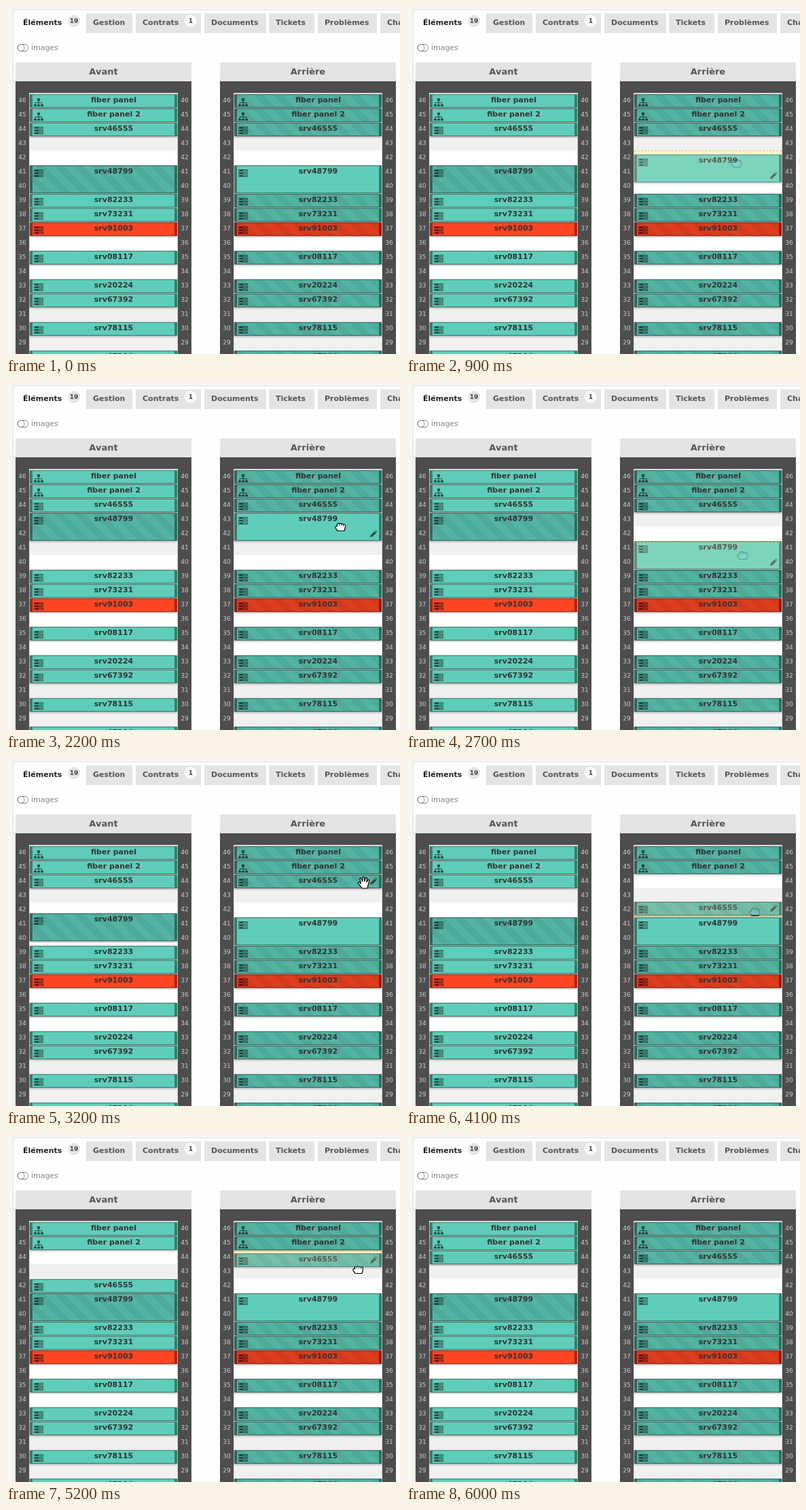
Recreate the animation shown at these times as an HTML page. Size 580 by 513 pixels, loop 7.2 s.

```html
<!DOCTYPE html>
<html lang="fr">
<head>
<meta charset="utf-8">
<title>Rack</title>
<style>
html, body { margin: 0; width: 100%; height: 100%; overflow: hidden; }
body { background: #f7f6f2; font: 11px "DejaVu Sans", sans-serif; color: #555; position: relative; }
div, svg { position: absolute; }
#panel { left: 10px; top: 5px; right: 0; bottom: 0; background: #fefefe; border: solid #e2e1de; border-width: 1px 0 0 1px; box-sizing: border-box; }
.tab { top: 11px; height: 29px; line-height: 27px; background: #e4e4e4; padding-left: 10px; box-sizing: border-box; font-weight: bold; white-space: nowrap; }
.tab.on { background: none; color: #222; }
.badge { top: 13px; width: 18px; height: 18px; border-radius: 9px; font: bold 9px/18px "DejaVu Sans", sans-serif; text-align: center; color: #444; }
.rack { top: 83px; width: 259px; bottom: 0; background: #4d4d4d; }
.head { width: 100%; height: 28px; background: #e4e4e4; font: bold 13px/27px "DejaVu Sans", sans-serif; text-align: center; }
.grid { left: 20px; top: 45px; width: 217px; height: 400px; border: 1px solid #d8d8d8;
  background: repeating-linear-gradient(#fff 0 21px, #f0f0f0 21px 42px); }
.num { width: 20px; font-size: 9px; line-height: 20px; text-align: center; color: #ccc; }
.item { left: 0; width: 217px; box-sizing: border-box; border: solid rgba(0,0,0,.4); border-width: 1px 4px;
  background-color: #5ecdb9; box-shadow: 0 1px 3px rgba(0,0,0,.4); }
.item.red { background-color: #ff4422; }
.item.back { background-image: repeating-linear-gradient(45deg, rgba(0,0,0,.12) 0 10px, rgba(0,0,0,.17) 10px 20px); }
.item b { position: absolute; left: 15px; width: 100%; text-align: center; line-height: 16px; color: #333; }
.item svg { left: 1px; top: 3px; opacity: .6; }
.item .pencil { left: auto; right: 2px; top: auto; bottom: 3px; visibility: hidden; opacity: .75; }
.drop { left: 0; width: 217px; box-sizing: border-box; border: 1px dashed #d9c94a; background: #fbf5cc; }
.tip { left: 574px; width: 120px; height: 105px; border: 1px solid #ccc; background: #fff; line-height: 20px; white-space: pre; padding-left: 2px; }
.tip span { position: relative; top: 12px; }
</style>
</head>
<body>
<div id="panel"></div>
<svg style="left:16px;top:55px" width="20" height="13" fill="none" stroke="#888"><rect x="1" y="1.5" width="16" height="10" rx="5"/><circle cx="6" cy="6.5" r="5"/></svg>
<div style="left:37px;top:55px;color:#888">images</div>
<script>
const STEP = 21, LOOP = 7200;
const icons = {
  server: '<svg width="16" height="14" fill="none" stroke="#000"><path d="M1.5 2.5h13v2h-13zM1.5 6.5h13v2h-13zM1.5 10.5h13v2h-13zM3 3.5h5M3 7.5h5M3 11.5h5"/></svg>',
  tree: '<svg width="16" height="16" fill="none" stroke="#000"><path d="M8 4v8M3 11V8.5h10V11"/><path fill="#000" d="M6.5 2.5h3v3h-3zM1.5 11.5h3v2h-3zM6.5 11.5h3v2h-3zM11.5 11.5h3v2h-3z"/></svg>',
  pencil: '<svg class="pencil" width="12" height="12"><path d="M1 11l1-3.5L7.5 2 10 4.5 4.500 10zM8.300 1.300l1-.8L11.500 2.700l-.8 1z" fill="#222"/></svg>'
};
const items = [
  [0, 'fiber panel'], [1, 'fiber panel 2'], [2, 'srv46555'], [5, 'srv48799', 2], [7, 'srv82233'],
  [8, 'srv73231'], [9, 'srv91003'], [11, 'srv08117'], [13, 'srv20224'], [14, 'srv67392'],
  [16, 'srv78115'], [18, 'srv47294']
];

function add(parent, cls, css, html = '') {
  const el = document.createElement('div');
  el.className = cls;
  el.style.cssText = css;
  el.innerHTML = html;
  parent.append(el);
  return el;
}
const body = document.body;

for (const [x, w, text] of [[15, 98, 'Éléments'], [118, 68, 'Gestion'], [191, 96, 'Contrats'], [292, 91, 'Documents'],
  [387, 67, 'Tickets'], [459, 87, 'Problèmes'], [551, 98, 'Changements']])
  add(body, x < 20 ? 'tab on' : 'tab', `left:${x}px;width:${w}px`, text);
add(body, 'badge', 'left:91px;background:#e4e4e4', '19');
add(body, 'badge', 'left:263px;background:#fbfbfb', '1');

function makeRack(x, title, rear) {
  const rack = add(body, 'rack', `left:${x}px`);
  add(rack, 'head', '', title);
  for (let r = 0; r < 19; r++)
    for (const left of [0, 239]) add(rack, 'num', `left:${left}px;top:${46 + STEP * r}px`, 46 - r);
  const grid = add(rack, 'grid', '');
  const drop = add(grid, 'drop', 'display:none');
  const boxes = items.map(([row, name, h = 1]) => {
    const back = rear !== (name === 'srv48799');
    const cls = 'item' + (back ? ' back' : '') + (name === 'srv91003' ? ' red' : '');
    const icon = row < 2 ? icons.tree : icons.server;
    return add(grid, cls, `top:${STEP * row + 1}px;height:${STEP * h - 1}px`, icon + `<b>${name}</b>` + icons.pencil);
  });
  return { boxes, drop };
}
const front = makeRack(14, 'Avant', false), rear = makeRack(315, 'Arrière', true);
const tip = add(body, 'tip', '', '<span>C\nT\nN\nr</span>');

const cursor = add(body, '', 'left:0;top:0', `
<svg width="20" height="20" fill="#fff" stroke="#000" stroke-width="1.2" stroke-linejoin="round"><path d="M7 18C5 15 3 13 1.500 10.500c-.7-1.500 1-2.300 2.200-1L5.500 11 4 4.500c-.4-2 1.800-2.300 2.300-.6L7.800 8 8 2.500c0-2 2.300-2 2.400 0L10.800 8l1.400-4.700c.5-1.800 2.600-1.300 2.300.6L13.800 9l2-2.800c1-1.500 2.700-.5 2 1-1 3-1.600 5-2 7L15 18z"/></svg>
<svg width="20" height="20" fill="#fff" stroke="#000" stroke-width="1.2" stroke-linejoin="round"><path d="M5 18.500C4 16.500 2 15 1.800 13c0-1.700 1.700-2 2.700-1.300V9c.2-2 2.300-2 3-.8.800-1.300 2.500-1 3 .2 1-1 2.600-.6 3 .7 1.300-.7 3 0 3 1.700 0 3-.5 5-1.500 7.700z"/><path d="M7.500 9v2M10.500 9v2M13.500 9.500v2" stroke-width=".9"/></svg>`);
const [openHand, fist] = cursor.children;

// [item, grab, release, moment the front view follows, from row, to row]
const drags = [
  [3, 700, 1400, 1580, 5, 3], [3, 2200, 2900, 3010, 3, 5],
  [2, 3700, 4400, 4520, 2, 4], [2, 4900, 5400, 5680, 4, 2]
];
const path = [
  [200, 572, 262], [300, 530, 257], [400, 500, 250], [500, 487, 245], [700, 487, 245], [900, 487, 229],
  [1300, 493, 211], [2200, 493, 211], [2800, 497, 261], [3000, 497, 261], [3200, 527, 184],
  [3700, 527, 184], [4100, 514, 224], [4200, 519, 235], [4900, 519, 235], [5200, 519, 197]
];
const tipFade = [[300, 0], [500, 1], [700, 1], [900, .12], [1000, 0], [3200, 0], [3400, 1], [3600, 1], [3900, 0]];

function track(keys, t) {
  const i = keys.findIndex(k => k[0] > t);
  if (i < 0) return keys.at(-1).slice(1);
  if (!i) return keys[0].slice(1);
  const a = keys[i - 1], b = keys[i], p = (t - a[0]) / (b[0] - a[0]);
  return a.slice(1).map((v, n) => v + (b[n + 1] - v) * p);
}

function draw(t) {
  const [cx, cy] = track(path, t);
  const shown = t >= 200 && t < 6000;
  const frontRow = { 2: 2, 3: 5 }, rearTop = { 2: 2 * STEP, 3: 5 * STEP };
  let held = -1, closed = false;
  rear.drop.style.display = 'none';

  for (const [id, grab, release, follow, from, to] of drags) {
    if (t >= grab && t < follow) closed = true;
    if (t >= release) rearTop[id] = to * STEP;
    else if (t >= grab) {
      rearTop[id] = from * STEP + cy - track(path, grab)[1];
      if (t > grab) {
        held = id;
        const h = items[id][2] || 1;
        rear.drop.style.cssText = `top:${Math.round(rearTop[id] / STEP) * STEP}px;height:${h * STEP}px`;
      }
    }
    if (t >= follow) {
      const p = Math.min(1, (t - follow) / 300);
      frontRow[id] = from + (to - from) * (1 - (1 - p) ** 2);
    }
  }

  for (const id of [2, 3]) {
    front.boxes[id].style.top = frontRow[id] * STEP + 1 + 'px';
    rear.boxes[id].style.top = rearTop[id] + 1 + 'px';
  }
  rear.boxes.forEach((box, id) => {
    const y = cy - 5 - 129 - box.offsetTop;
    const over = held < 0 ? cx < 553 && y >= 0 && y < box.offsetHeight : held === id;
    box.lastChild.style.visibility = shown && over ? 'visible' : 'hidden';
    box.style.opacity = held === id ? .8 : 1;
    box.style.zIndex = held === id ? 1 : 0;
  });

  tip.style.top = (t < 2000 ? 205 : 121) + 'px';
  tip.style.opacity = track(tipFade, t)[0];
  cursor.style.display = shown ? '' : 'none';
  cursor.style.transform = `translate(${Math.round(cx) - 10}px, ${Math.round(cy) - 10}px)`;
  openHand.style.display = closed ? 'none' : '';
  fist.style.display = closed ? '' : 'none';
}

const start = performance.now();
function tick() {
  draw(Math.floor((performance.now() - start) % LOOP / 100) * 100);
  requestAnimationFrame(tick);
}
tick();
</script>
</body>
</html>
```
